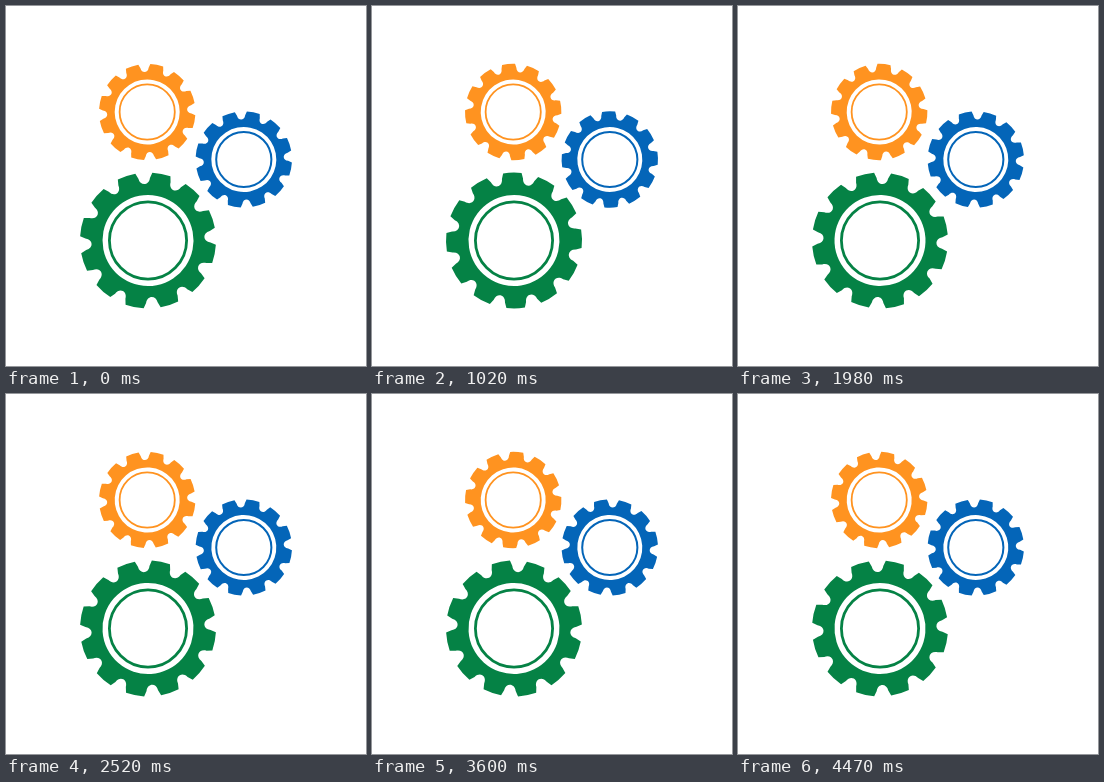
These frames come from a looping animation (360x360 px, 4500 ms). An HTML page:

```html
<!DOCTYPE html>
<html>
<head>
<meta charset="utf-8">
<title>Gears</title>
<style>
html, body { margin: 0; width: 100%; height: 100%; overflow: hidden; background: #fff; }
svg { display: block; width: 100vw; height: 100vh; }
</style>
</head>
<body>
<svg id="stage" viewBox="0 0 360 360"></svg>
<script>
const LOOP = 4500, TEETH = 12, PITCH = 360 / TEETH;
const START = -78.5;    // angle of the tooth right of the top
// Time in ms and teeth passed: fast, slow, fast.
const steps = [[0, 0], [1035, 1.45], [3270, 2.3], [LOOP, 4]];
const gears = [
  { x: 141.2, y: 106, r: 48.2, hole: 32.5, ring: 27.6, line: 1.8, color: '#ff9320', dir: 1 },
  { x: 237.8, y: 153.5, r: 48.2, hole: 32.5, ring: 27.6, line: 2, color: '#0465b8', dir: -1 },
  { x: 142, y: 234.5, r: 68, hole: 45.5, ring: 38.6, line: 2.8, color: '#058245', dir: -1 }
];
const stage = document.getElementById('stage');

function add(parent, tag, attrs) {
  const el = document.createElementNS('http://www.w3.org/2000/svg', tag);
  for (const k in attrs) el.setAttribute(k, attrs[k]);
  return parent.appendChild(el);
}

function polar(r, deg) {
  const a = deg * Math.PI / 180;
  return (r * Math.cos(a)).toFixed(2) + ' ' + (r * Math.sin(a)).toFixed(2);
}

// Flat teeth separated by rounded notches, with a round hole.
function gearPath(r, hole) {
  const half = PITCH * 0.26;
  let d = '';
  for (let i = 0; i < TEETH; i++) {
    const a = i * PITCH, mid = a + PITCH / 2;
    d += `${i ? 'L' : 'M'}${polar(r, a - half)}A${r} ${r} 0 0 1 ${polar(r, a + half)}`;
    d += `L${polar(r * 0.92, mid - 5.3)}`;
    d += `C${polar(r * 0.805, mid - 4.6)} ${polar(r * 0.805, mid + 4.6)} ${polar(r * 0.92, mid + 5.3)}`;
  }
  return `${d}ZM${hole} 0A${hole} ${hole} 0 1 0 ${-hole} 0A${hole} ${hole} 0 1 0 ${hole} 0Z`;
}

for (const g of gears) {
  const group = add(stage, 'g', { transform: `translate(${g.x} ${g.y})` });
  g.wheel = add(group, 'path', { d: gearPath(g.r, g.hole), fill: g.color, 'fill-rule': 'evenodd' });
  add(group, 'circle', { r: g.ring, fill: 'none', stroke: g.color, 'stroke-width': g.line });
}

function teethPassed(t) {
  const i = steps.findIndex(s => t < s[0]);
  const [t0, n0] = steps[i - 1], [t1, n1] = steps[i];
  return n0 + (n1 - n0) * (t - t0) / (t1 - t0);
}

function draw(now) {
  const turn = teethPassed(now % LOOP) * PITCH;
  for (const g of gears) g.wheel.setAttribute('transform', `rotate(${START + g.dir * turn})`);
  requestAnimationFrame(draw);
}
draw(performance.now());
</script>
</body>
</html>
```
